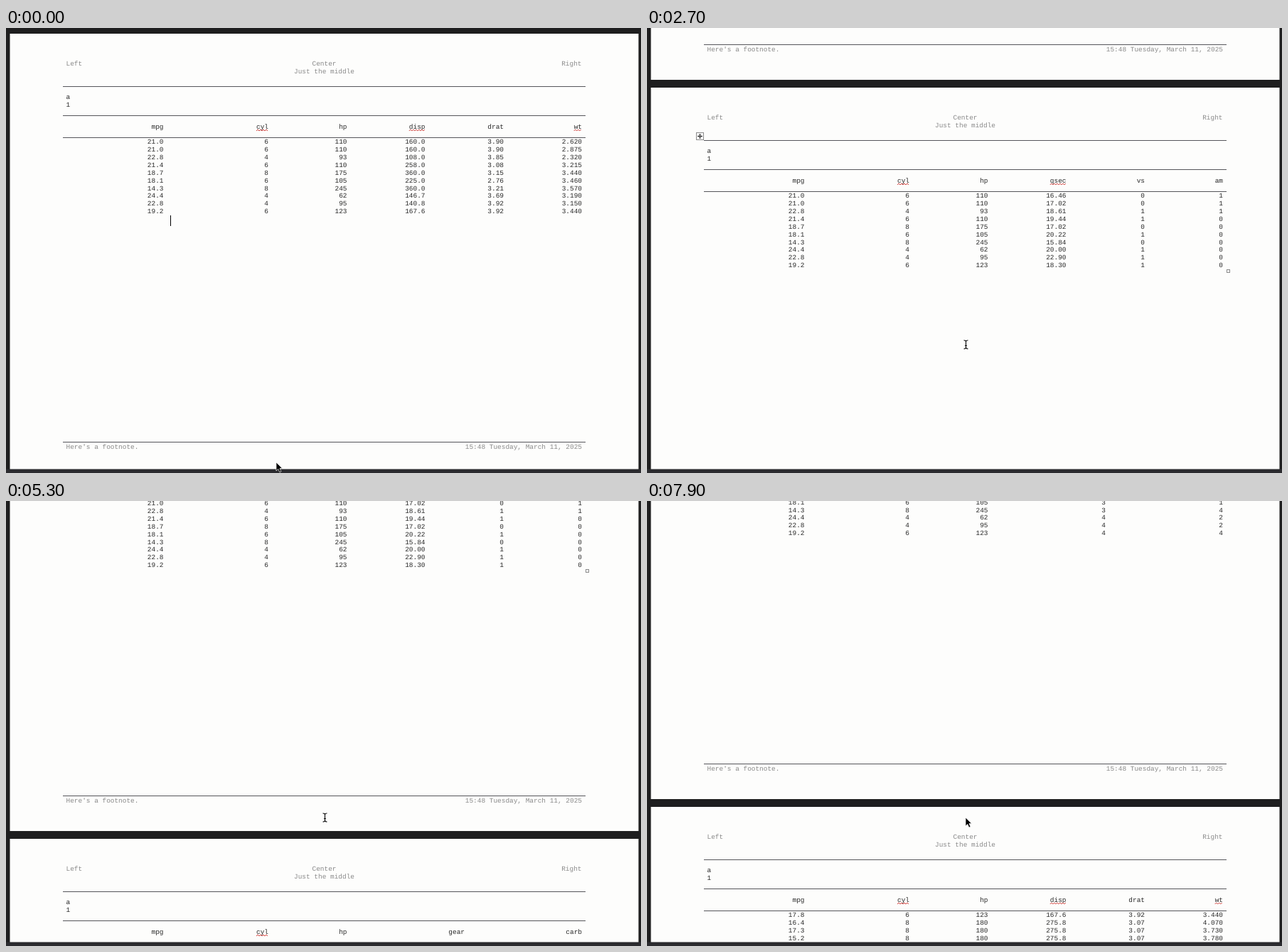
Write an HTML page that moves like this. It is 893 by 627 pixels and loops after 8000 ms.

```html
<!DOCTYPE html>
<html lang="en">
<head>
<meta charset="utf-8">
<title>Paged table</title>
<style>
  html, body { margin: 0; width: 100%; height: 100%; overflow: hidden; background: #1e1e1f; }
  svg { display: block; width: 893px; height: 627px; }
  text {
    font: 9.45px "Liberation Mono", "Courier New", monospace;
    fill: #2a2a2a;
    text-rendering: geometricPrecision;
    white-space: pre;
  }
  .muted { fill: #8a8a8a; }
  .crisp { shape-rendering: crispEdges; }
  .squiggle { fill: none; stroke: #d2413c; stroke-width: 1; }
</style>
</head>
<body>
<svg viewBox="0 0 893 627">
  <rect width="893" height="627" fill="#1e1e1f"/>
  <g id="pages"></g>
  <rect y="621.5" width="893" height="5.5" fill="#2b2b2f"/>
  <path id="arrow" d="M0 0V12L2.8 9.4L4.9 14L7 13L5 8.6H8.6Z" fill="#000" stroke="#fff" stroke-width=".7"/>
  <path id="beam" d="M-2.5 -6Q.5 -6 .5 -4Q.5 -6 3.5 -6M.5 -4.5V4.5M-2.5 6Q.5 6 .5 4Q.5 6 3.5 6M-1 1.5H2"
        fill="none" stroke="#111" stroke-width="1.2"/>
</svg>
<script>
const LOOP = 8000, STEP = 100, PITCH = 636.5, CHAR = 5.67;
const $ = id => document.getElementById(id);

const SIX = [221.5, 369, 479.5, 589.5, 700, 810];
const FIVE = [221.5, 369, 479.5, 645, 810];
const MISSPELT = ['cyl', 'disp', 'qsec', 'wt'];

const cars = ['21.0 6 110', '21.0 6 110', '22.8 4 93', '21.4 6 110', '18.7 8 175',
              '18.1 6 105', '14.3 8 245', '24.4 4 62', '22.8 4 95', '19.2 6 123'];
const join = extra => cars.map((car, i) => car + ' ' + extra[i]);

const tables = [
  { edges: SIX, head: 'mpg cyl hp disp drat wt', rows: join([
    '160.0 3.90 2.620', '160.0 3.90 2.875', '108.0 3.85 2.320', '258.0 3.08 3.215', '360.0 3.15 3.440',
    '225.0 2.76 3.460', '360.0 3.21 3.570', '146.7 3.69 3.190', '140.8 3.92 3.150', '167.6 3.92 3.440']) },
  { edges: SIX, head: 'mpg cyl hp qsec vs am', rows: join([
    '16.46 0 1', '17.02 0 1', '18.61 1 1', '19.44 1 0', '17.02 0 0',
    '20.22 1 0', '15.84 0 0', '20.00 1 0', '22.90 1 0', '18.30 1 0']) },
  { edges: FIVE, head: 'mpg cyl hp gear carb', rows: join([
    '4 4', '4 4', '4 1', '3 1', '3 2', '3 1', '3 4', '4 2', '4 2', '4 4']) },
  { edges: SIX, head: 'mpg cyl hp disp drat wt', rows: [
    '17.8 6 123 167.6 3.92 3.440', '16.4 8 180 275.8 3.07 4.070',
    '17.3 8 180 275.8 3.07 3.730', '15.2 8 180 275.8 3.07 3.780'] }
];

const label = (x, y, str, anchor = 'start', cls = '') =>
  `<text x="${x}" y="${y}" text-anchor="${anchor}" class="${cls}">${str}</text>`;
const rule = y => `<rect class="crisp" x="80" y="${y}" width="735" height="1" fill="#55555a"/>`;

function squiggle(right, length) {
  let d = `M${right - length * CHAR} 145`;
  for (let x = 2, up = true; x <= length * CHAR; x += 2, up = !up) {
    d += `L${right - length * CHAR + x} ${up ? 143 : 145}`;
  }
  return `<path class="squiggle" d="${d}"/>`;
}

function pageMarkup({ edges, head, rows }) {
  const cells = (line, y) => line.split(' ').map((c, i) => label(edges[i], y, c, 'end')).join('');
  const marks = head.split(' ').map((name, i) =>
    MISSPELT.includes(name) ? squiggle(edges[i], name.length) : '').join('');
  return '<rect x="5.5" y="8" width="884" height="625" fill="#fdfdfc"/>' +
    label(84.5, 53, 'Left', 'start', 'muted') +
    label(447.5, 53, 'Center', 'middle', 'muted') +
    label(447.5, 64, 'Just the middle', 'middle', 'muted') +
    label(809.5, 53, 'Right', 'end', 'muted') +
    [82, 123, 154, 583].map(rule).join('') +
    label(84.5, 100, 'a') + label(84.5, 111, '1') +
    cells(head, 142) + marks +
    rows.map((row, i) => cells(row, 163.3 + i * 10.88)).join('') +
    label(84.5, 593, "Here's a footnote.", 'start', 'muted') +
    label(810, 593, '15:48 Tuesday, March 11, 2025', 'end', 'muted');
}

const caret = '<rect class="crisp" x="231" y="264" width="1" height="15" fill="#000"/>';
const handles = `<g id="handles">
  <rect x="69.5" y="71.5" width="10" height="10" fill="#fff" stroke="#8a8a8a"/>
  <path d="M71.5 76.5H77.5M74.5 73.5V79.5" stroke="#222"/>
  <path d="M71 76.5l1.5-1.5v3zM78 76.5l-1.5-1.5v3zM74.5 73l-1.5 1.5h3zM74.5 80l-1.5-1.5h3z" fill="#222"/>
  <rect x="815.5" y="264.5" width="4" height="4" fill="#fff" stroke="#8a8a8a"/></g>`;

$('pages').innerHTML = tables.map((table, i) =>
  `<g>${pageMarkup(table)}${[caret, handles][i] || ''}</g>`).join('');
const pages = [...$('pages').children];

// Scroll position over time, joined by a monotone cubic.
const keys = [[0, 0], [800, 0], [1200, 88], [1700, 261], [2200, 440], [2700, 560.4], [3400, 595],
  [3500, 595], [3700, 602.7], [3800, 605], [3900, 605], [4400, 625], [4700, 625], [5300, 804.6],
  [5700, 1000], [6200, 1189.6], [6500, 1211.6], [6600, 1211.6], [7000, 1275], [7500, 1275], [7900, 1486.2]];
const slope = i => (keys[i + 1][1] - keys[i][1]) / (keys[i + 1][0] - keys[i][0]);
const tangents = keys.map((_, i) => {
  if (i === 0) return 0;
  if (i === keys.length - 1) return slope(i - 1);
  const a = slope(i - 1), b = slope(i);
  return a * b > 0 ? 2 * a * b / (a + b) : 0;
});

function scrollAt(t) {
  const i = Math.max(0, keys.findIndex(k => k[0] >= t) - 1);
  const [t0, s0] = keys[i], [t1, s1] = keys[i + 1];
  const span = t1 - t0, u = (t - t0) / span, v = 1 - u;
  return s0 * (1 + 2 * u) * v * v + s1 * u * u * (3 - 2 * u) +
    span * u * v * (tangents[i] * v - tangents[i + 1] * u);
}

function draw(t) {
  const scroll = scrollAt(t);
  pages.forEach((page, i) =>
    page.setAttribute('transform', `translate(0 ${Math.round(i * PITCH - scroll)})`));
  $('handles').style.display = t >= 1800 ? '' : 'none';

  const u = Math.min(1, t / 700), ease = u * u * (3 - 2 * u);
  const x = 380 + 68 * ease, y = 612 - 166 * ease;
  const local = (y + scroll) % PITCH;
  const isArrow = t < 300 || local > 620 || local < 82;
  $('arrow').style.display = isArrow ? '' : 'none';
  $('beam').style.display = isArrow ? 'none' : '';
  $(isArrow ? 'arrow' : 'beam').setAttribute('transform', `translate(${x} ${y})`);
}

const start = performance.now();
function tick(now) {
  const t = Math.max(0, now - start) % LOOP;
  draw(Math.floor(t / STEP) * STEP);
  requestAnimationFrame(tick);
}
draw(0);
requestAnimationFrame(tick);
</script>
</body>
</html>
```
